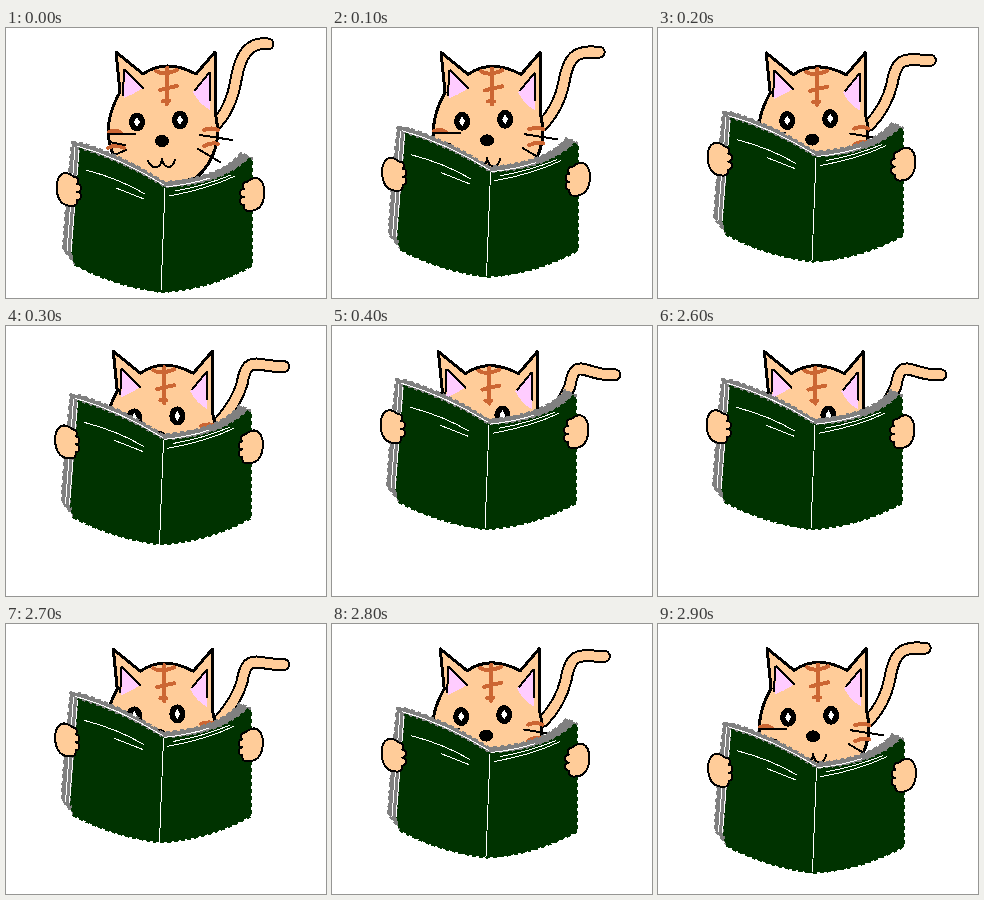
An HTML page that plays this animation: 320 by 270 pixels, repeating every 3 s.

```html
<!DOCTYPE html>
<html lang="en">
<head>
<meta charset="utf-8">
<title>Reading cat</title>
<style>
  html, body { margin: 0; width: 100%; height: 100%; overflow: hidden; background: #fff; }
  svg { display: block; width: 320px; height: 270px; shape-rendering: crispEdges; --k: 0; }
  path { fill: none; stroke-linecap: round; stroke-linejoin: round; }

  /* --k runs from 0 (book low) to 5 (book high) */
  #head { transform: translate(calc(var(--k) * -.9px), calc(var(--k) * .4px)); }
  #face { transform: translateY(calc(var(--k) * -1.1px)); }
  #book { transform: translate(calc(var(--k) * -.5px), calc(var(--k) * -15.2px)); }

  .skin { fill: #fc9; stroke: #000; stroke-width: 3; }
  .pink { fill: #fcf; }
  .ink { stroke: #000; stroke-width: 2; }
  .stripe { stroke: #c63; stroke-width: 4; }
  .white { stroke: #fff; stroke-width: 1; }
  .shine { fill: #fff; }
  .pages, .cover { stroke-width: 2; stroke-linecap: butt; stroke-dasharray: 4 3; }
  .pages { fill: #808080; stroke: #808080; }
  .cover { fill: #030; stroke: #030; }
  #hand { stroke-width: 2; }
</style>
</head>
<body>
<svg viewBox="0 0 320 270">
  <path class="tail" stroke="#000" stroke-width="13"/>
  <path class="tail" stroke="#fc9" stroke-width="9"/>

  <g id="head">
    <path class="skin" d="M114 64L110 24L137 46Q160 30 190 46L209 24L209 84Q219 124 190 150L158 158L125 150Q86 114 114 64Z"/>
    <path class="pink" d="M119 42L118 70Q128 66 137 60Z"/>
    <path class="pink" d="M203 45L187 64Q193 76 204 82Z"/>
    <path class="ink" d="M119 42L137 60M118 42L117 67M203 45L189 62M204 45V72"/>
    <path class="stripe" d="M161 40V76M150 43Q157 48 171 42M154 62Q161 60 171 58M157 73H163"/>
    <g id="face">
      <path class="stripe" d="M103 104Q110 101 115 105M102 120Q110 115 118 120M198 102Q206 99 212 102M198 118Q205 114 212 116"/>
      <path class="ink" d="M103 106L129 106M103 114L119 117M104 129L120 122M194 107L226 112M192 121L214 134"/>
      <ellipse cx="131" cy="94" rx="8" ry="9.5"/>
      <ellipse cx="174" cy="92" rx="8" ry="9.5"/>
      <path class="shine" d="M131 89l3 5l-3 5l-3-5ZM174 87l3 5l-3 5l-3-5Z"/>
      <ellipse cx="156" cy="113" rx="7" ry="6"/>
      <path class="ink" d="M142 133Q146 142 153 138Q156 135 156 131Q157 138 162 139Q167 139 169 132"/>
    </g>
  </g>

  <g id="book">
    <path class="pages" d="M66 114L76 115Q118 128 158 154Q215 150 235 125L246 130L240 150L158 165L80 150L70 237L57 221Q60 170 66 114Z"/>
    <path class="cover" d="M74 121Q118 135 159 160Q215 158 243 131L246 132V238Q202 262 155 264Q108 258 69 237L66 222Z"/>
    <path class="white" d="M69 119L61 223M73 122L65 224M71 118Q114 130 158 157M160 159Q186 156 204 150"/>
    <path class="white" d="M159 160L155 263M80 142Q114 151 139 166M110 160L138 171M163 168Q202 161 229 148M169 163Q198 158 225 147"/>
    <path id="hand" class="skin" d="M68 149C56 139 49 150 51 164Q53 178 66 178Q72 178 71 172a4 4 0 0 0 0-8a4 4 0 0 0 0-8a4 4 0 0 0-3-7Z"/>
    <use href="#hand" transform="translate(309 5) scale(-1 1)"/>
  </g>
</svg>
<script>
const svg = document.querySelector('svg');
const tails = document.querySelectorAll('.tail');

// The tail bends down as the book rises; each point drifts in a straight line
function tailPath(k) {
  const at = (x, y, dx, dy) => `${x + dx * k / 5} ${y + dy * k / 5} `;
  return 'M' + at(208, 98, 8, -2) +
    'Q' + at(225, 82, 9, -8) + at(230, 52, 10, 10) +
    'C' + at(235, 22, 10, 8) + at(246, 14, 10, 46) + at(262, 16, 26, 41);
}

// Up in five steps, hold, then down in five
const stepAt = t => t < 2600 ? Math.min(5, Math.floor(t / 100)) : 4 - Math.floor((t - 2600) / 100);

function tick() {
  const k = stepAt(performance.now() % 3000);
  svg.style.setProperty('--k', k);
  tails.forEach(p => p.setAttribute('d', tailPath(k)));
  requestAnimationFrame(tick);
}
tick();
</script>
</body>
</html>
```
